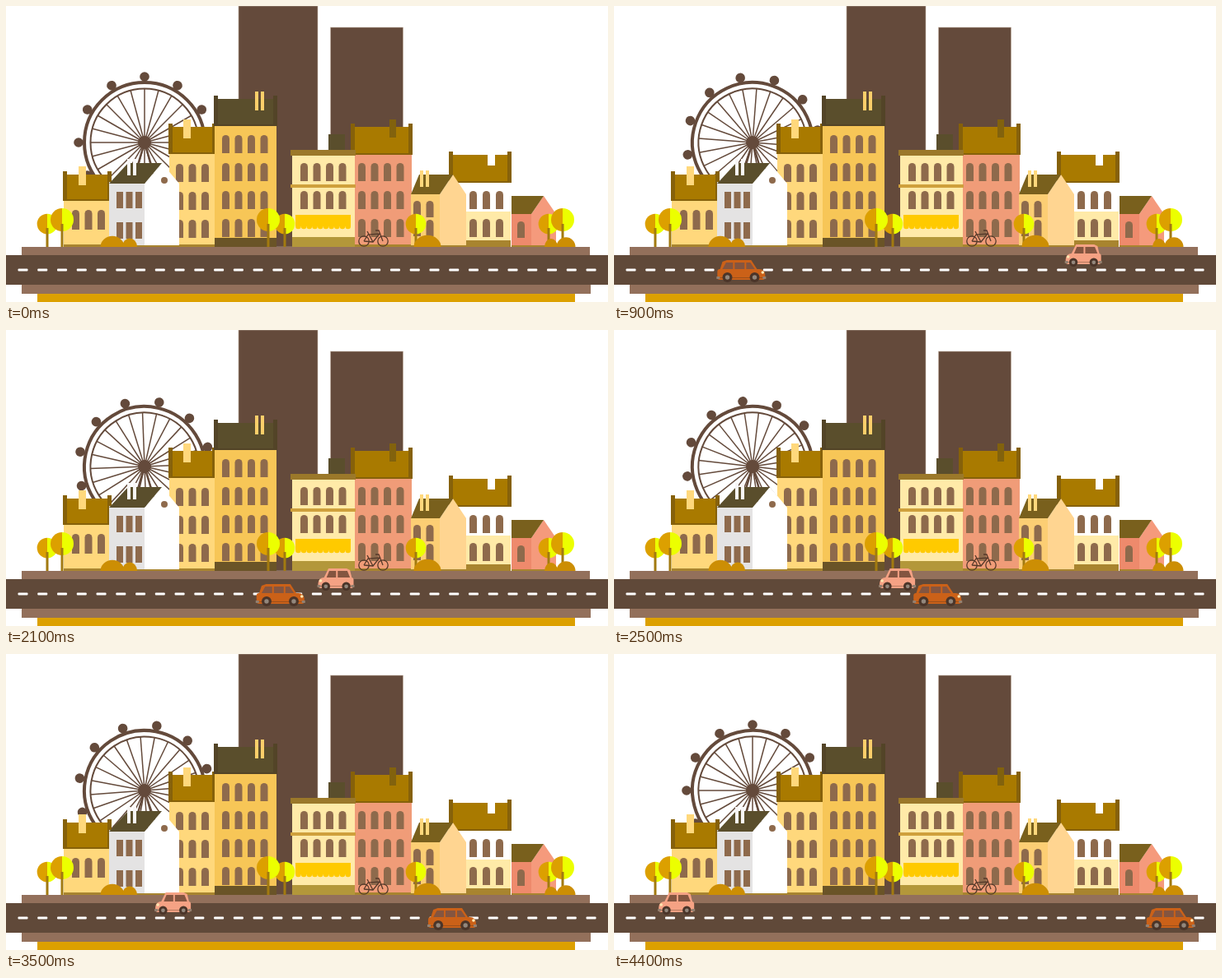
Animation of 730x360 px, one loop 4500 ms. Source, as an HTML page with a canvas:

```html
<!DOCTYPE html>
<html lang="en">
<head>
<meta charset="utf-8">
<title>Autumn town</title>
<style>
html, body { margin: 0; width: 730px; height: 360px; overflow: hidden; background: #fff; }
canvas { display: block; }
</style>
</head>
<body>
<canvas id="stage" width="730" height="360"></canvas>
<script>
const ctx = document.getElementById('stage').getContext('2d');
const STEP = 100, STEPS = 45, GROUND = 293, TAU = Math.PI * 2;
const BROWN = '#644a3b', GLASS = '#8e6a4c', TILE = '#a97a00', OLIVE = '#5a4e2c',
      CREAM = '#ffd87c', PALE = '#ffeaa8', PINK = '#f09c78', GOLD = '#dca000',
      LIME = '#ecff00', KERB = '#93705b', TRIM = '#a8842f', SHADE = 'rgba(70, 50, 30, .35)';

function rect(color, x, y, w, h) {
  ctx.fillStyle = color;
  ctx.fillRect(x, y, w, h);
}

function rounded(color, x, y, w, h, radii) {
  ctx.fillStyle = color;
  ctx.beginPath();
  ctx.roundRect(x, y, w, h, radii);
  ctx.fill();
}

function path(p) {
  ctx.beginPath();
  for (let i = 0; i < p.length; i += 2) ctx.lineTo(p[i], p[i + 1]);
}

function poly(color, ...p) {
  ctx.fillStyle = color;
  path(p);
  ctx.fill();
}

function line(color, width, ...p) {
  ctx.strokeStyle = color;
  ctx.lineWidth = width;
  path(p);
  ctx.stroke();
}

function disc(color, x, y, r, from = 0, to = TAU) {
  ctx.fillStyle = color;
  ctx.beginPath();
  ctx.arc(x, y, r, from, to);
  ctx.fill();
}

function ring(color, x, y, r, width) {
  ctx.strokeStyle = color;
  ctx.lineWidth = width;
  ctx.beginPath();
  ctx.arc(x, y, r, 0, TAU);
  ctx.stroke();
}

function tower(x, y, w) {
  rect(BROWN, x, y, w, GROUND - y);
  ctx.strokeStyle = '#c4b2a4';
  ctx.lineWidth = 0.6;
  ctx.strokeRect(x, y, w, GROUND - y);
}

function ferrisWheel(angle) {
  ctx.save();
  ctx.translate(168, 166);
  line(BROWN, 2.5, -10, 34, 0, 0, 10, 34);
  ctx.rotate(angle);
  ring(BROWN, 0, 0, 73, 4);
  ring(BROWN, 0, 0, 65.5, 2);
  for (let i = 0; i < 24; i++) {
    line(BROWN, 1.5, 0, 0, 0, -66);
    if (i % 2 === 0) disc(BROWN, 0, -80, 5.8);
    ctx.rotate(TAU / 24);
  }
  disc(BROWN, 0, 0, 8);
  ctx.restore();
}

function windows(x, y, cols, rows, { w = 9, h = 22, dx = 15.5, dy = 34, arch = w / 2 } = {}) {
  for (let r = 0; r < rows; r++)
    for (let c = 0; c < cols; c++)
      rounded(GLASS, x + c * dx, y + r * dy, w, h, [arch, arch, 0, 0]);
}

function chimney(color, x, y, w = 4, h = 20) {
  rect(color, x, y, w, h);
}

// Flat front under a tiled roof with a raised edge on either side.
function townhouse(wall, tile, x, w, top, eave, base = 3) {
  rect(wall, x, eave, w, GROUND - eave);
  rect(TRIM, x, GROUND - base, w, base);
  rect(tile, x, top, w, eave - top);
  rect(SHADE, x, eave - 2, w, 2);
  for (const edge of [x - 1, x + w - 4]) {
    rect(tile, edge, top - 4, 5, eave - top + 4);
    rect(SHADE, edge, top - 4, 5, eave - top + 4);
  }
}

// Side wall from x to mid, gable front from mid to end.
function gabled(side, front, tile, x, mid, end, top, eave, lean) {
  const ridge = (mid + end) / 2;
  rect(side, x, eave - 2, mid - x, GROUND - eave + 2);
  poly(front, ridge, top, end, eave, end, GROUND, mid, GROUND, mid, eave);
  poly(tile, x + lean, top, ridge, top, mid, eave, x, eave);
  rect(TRIM, x, GROUND - 2, end - x, 2);
}

function leftHouses() {
  townhouse(CREAM, TILE, 70, 57, 205, 237);
  chimney(CREAM, 88, 195, 9, 23);
  windows(80, 248, 3, 1, { h: 24 });

  townhouse(CREAM, TILE, 198, 56, 147, 180);
  chimney(CREAM, 215, 138, 9, 23);
  windows(206, 192, 3, 3);

  townhouse('#f7c657', OLIVE, 253, 75, 113, 146);
  rect('#6a5427', 253, 282, 75, 11);
  for (const x of [302, 309]) chimney('#fccf6a', x, 104, 4, 23);
  windows(262, 157, 4, 4);

  gabled('#e4e3e3', '#fff', OLIVE, 125, 168, 210, 191, 216, 23);
  for (const x of [147, 154]) chimney('#f8f6f6', x, 186);
  windows(134, 226, 3, 2, { w: 8, h: 20, dx: 11.5, dy: 37, arch: 0 });
  disc(GLASS, 192, 212, 4);
}

function shop() {
  rect(PALE, 347, 181, 76, GROUND - 181);
  rect('#9b782a', 345, 175, 79, 7);
  rect('#cfa03c', 345, 217, 79, 4);
  windows(357, 191, 4, 2);
  rect('#ffca00', 351, 254, 67, 14);
  for (let i = 0; i < 10; i++) disc('#ffca00', 354.4 + i * 6.7, 268, 3.3);
  rect('#b3973a', 347, 281, 76, 12);
}

function rightHouses() {
  chimney(OLIVE, 391, 156, 20);
  townhouse(PINK, TILE, 419, 73, 147, 181);
  chimney('#82620d', 465, 138, 8, 22);
  windows(427, 191, 4, 3);
  shop();

  townhouse('#fff', TILE, 538, 74, 181, 215, 8);
  rect(PALE, 558, 250, 54, 35);
  chimney('#fff', 584, 180, 9, 14);
  windows(562, 225, 3, 2, { dx: 16 });

  gabled('#fcce74', '#ffd591', '#79601d', 491, 526, 558, 205, 229, 10);
  for (const x of [502, 509]) chimney(CREAM, x, 200);
  windows(494, 237, 2, 2, { h: 20, dy: 23 });

  gabled('#ee8a6c', '#f59a7c', '#79601d', 613, 637, 667, 231, 253, 0);
  windows(620, 262, 1, 1, { h: 20 });
}

function tree(x, y) {
  const r = 14 - (y - 260) / 3;
  disc(GOLD, x, y, r, TAU / 4, TAU * 3 / 4);
  disc(LIME, x, y, r, -TAU / 4, TAU / 4);
  rect('#a27a10', x - 1.5, y + 5, 3, GROUND - y - 5);
}

function bush(x, w) {
  ctx.fillStyle = '#cc8e04';
  ctx.beginPath();
  ctx.ellipse(x, GROUND, w / 2, 6 + w / 4, 0, Math.PI, TAU);
  ctx.fill();
}

function greenery() {
  // Pairs of a low and a tall tree stand at both ends and in the middle.
  for (const [low, tall] of [[50, 68], [338, 318], [658, 675]]) {
    tree(low, 265);
    tree(tall, 260);
  }
  tree(497, 265);
  for (const [x, w] of [[129, 29], [150, 18], [511, 33], [661, 16], [679, 23]]) bush(x, w);
}

function bicycle() {
  const c = '#55392a';
  for (const x of [434, 457]) ring(c, x, 286, 6.2, 1.3);
  line(c, 1.3, 434, 286, 439, 278, 453, 277, 445, 287, 434, 286);
  line(c, 1.3, 445, 287, 438, 274);
  line(c, 1.3, 457, 286, 452, 273, 448, 273);
}

function street() {
  rect(KERB, 19, GROUND, 689, 10);
  rect(KERB, 19, 339, 690, 11);
  rect(GOLD, 38, 350, 652, 10);
  rect('#604939', 0, 303, 730, 36);
  for (let i = 0; i < 30; i++) rounded('#fff', 14.5 + i * 23.76, 319.5, 12, 3, 1);
}

// x, y is the top left corner; the front points along dir.
function car(x, y, dir, color, w, panes, wheel) {
  const h = 27, belt = 11, tail = w * 0.06, roofEnd = w * 0.7, hood = w * 0.84;
  ctx.save();
  ctx.translate(dir > 0 ? x : x + w, y);
  ctx.scale(dir, 1);
  poly(color, tail, belt + 2, tail * 2, 2, tail * 3.5, 0, roofEnd, 0, hood, belt + 2);
  rounded(color, 1, belt, w - 2, h - belt - 3, [3, 7, 3, 3]);
  poly('#845540', tail * 2, belt, tail * 3.2, 3, roofEnd - 1, 3, hood - 4, belt);
  for (let i = 1; i < panes; i++) rect(color, w * (0.1 + 0.7 * i / panes), 2, 2, belt);
  rect(SHADE, 2, h - 6, w - 4, 1);
  for (const end of [0, w - 4]) rect('#94806f', end, h - 7, 4, 3);
  disc('#ffe6b0', w - 4, belt + 4, 1.8);
  for (const axle of [0.22, 0.77]) {
    disc('#4b3529', w * axle, h - wheel, wheel);
    disc('#93877c', w * axle, h - wheel, wheel * 0.45);
  }
  ctx.restore();
}

function draw(step) {
  rect('#fff', 0, 0, 730, 360);
  tower(282, 0, 96);
  tower(393.5, 26, 88);
  // One cabin spacing every 15 steps, so the wheel looks endless.
  ferrisWheel(step % 15 / 14 * TAU / 12);
  leftHouses();
  rightHouses();
  bicycle();
  greenery();
  street();
  if (step > 0) {
    car(673.6 - step * 14.1, 290, -1, '#f5a284', 45, 2, 5.2);
    car(-9.5 + step * 14.87, 309, 1, '#cb6118', 60, 3, 6);
  }
}

const start = performance.now();
function tick() {
  draw(Math.floor((performance.now() - start) / STEP) % STEPS);
  requestAnimationFrame(tick);
}
tick();
</script>
</body>
</html>
```
